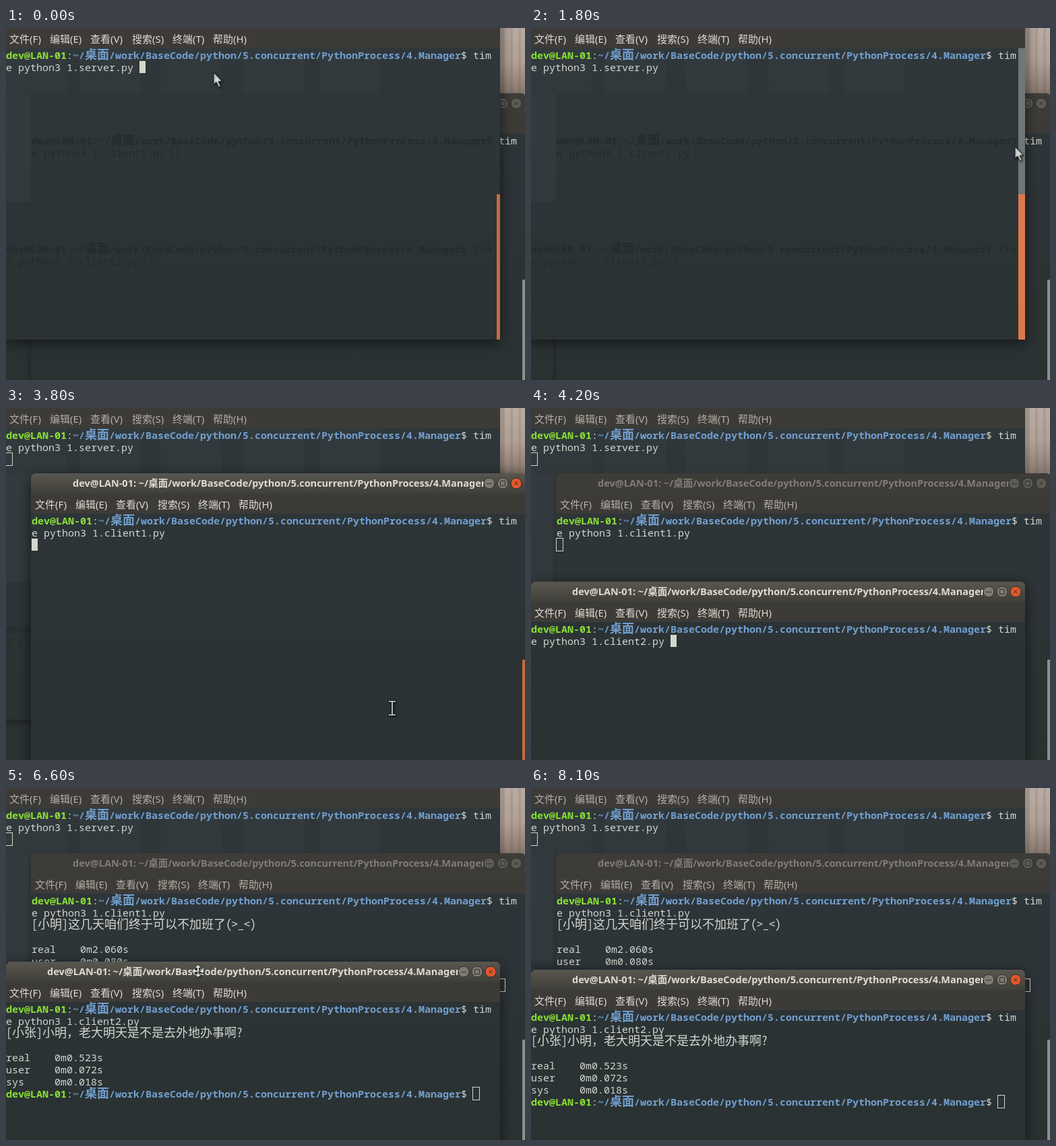
These frames come from a looping animation (770 px wide and 523 px high, 8200 ms). An HTML page with a canvas:

```html
<!DOCTYPE html>
<html lang="zh">
<head>
<meta charset="utf-8">
<style>
  html, body { margin: 0; width: 100%; height: 100%; overflow: hidden; background: #2d3436; }
  canvas { display: block; }
</style>
</head>
<body>
<canvas id="stage" width="770" height="523"></canvas>
<script>
const ctx = document.getElementById('stage').getContext('2d');
const LOOP = 8200, STEP = 100, BLINK = 600;
const COL = 9, ROW = 18, WIDTH = 733, HEIGHT = 463, TITLE = 30;
const CJK = '"Noto Sans CJK SC", "Noto Sans CJK"';
const MONO = `15px "Noto Sans Mono", monospace`;
const WIDE = `18px "Noto Sans Mono CJK SC", ${CJK}, monospace`;
const SANS = `"Noto Sans", ${CJK}, sans-serif`;
const GREEN = '#8ae234', BLUE = '#729fcf', TEXT = '#d3d7cf', GHOST = '#242b2d';
const HOST = 'dev@LAN-01';
const PATH = '~/桌面/work/BaseCode/python/5.concurrent/PythonProcess/4.Manager';
const MENU = [['文件(F)', 5], ['编辑(E)', 65], ['查看(V)', 125], ['搜索(S)', 187], ['终端(T)', 247], ['帮助(H)', 307]];
const PROMPT_COL = 77;

// x, y locate the menu bar; the title bar sits above it.
const server = { x: 0, y: 0, script: '1.server.py', enter: 1000, done: Infinity };
const client1 = { x: 38, y: 127, script: '1.client1.py', enter: 3300, done: 5400,
  message: '[小明]这几天咱们终于可以不加班了(>_<)', times: ['2.060', '0.080', '0.020'] };
const client2 = { x: 0, y: 288, script: '1.client2.py', enter: 4700, done: 5200,
  message: '[小张]小明，老大明天是不是去外地办事啊?', times: ['0.523', '0.072', '0.018'] };

// Window order, back to front
const STACKS = [
  [0, [client2, client1, server]],
  [2100, [client2, server, client1]],
  [4200, [server, client1, client2]]
];
// Keyboard focus; every entry restarts the blinking
const FOCUS = [[-500, server], [1000, server], [2100, client1], [3300, client1], [4100, null],
  [4200, client2], [4700, client2], [5100, client2], [6600, null], [7200, client2], [8100, null]];
const DRAG = [[0, 0], [6700, 5], [6800, 10], [7000, 11], [7100, 12]];
const POINTER = [
  [0, arrow, 308, 66], [100, beam, 309, 67], [700, null],
  [1400, beam, 309, 66], [1500, beam, 490, 112], [1600, beam, 675, 162],
  [1800, arrow, 718, 176], [1900, beam, 742, 188], [2000, beam, 755, 205],
  [2400, beam, 722, 214], [2500, beam, 640, 226], [2600, beam, 580, 231], [2700, beam, 559, 231],
  [3300, null], [3500, beam, 559, 231], [3600, beam, 563, 256], [3700, beam, 569, 340],
  [3800, beam, 573, 446], [3900, null],
  [5000, beam, 520, 497], [5100, beam, 500, 455], [5200, beam, 480, 420], [5300, beam, 466, 400],
  [5700, beam, 440, 378], [5800, beam, 390, 345], [5900, arrow, 330, 305], [6000, arrow, 290, 276],
  [6100, beam, 270, 255], [6200, arrow, 280, 266], [6300, arrow, 285, 271],
  [6600, fleur, 285, 272], [6700, fleur, 285, 277], [6800, fleur, 286, 282], [7000, fleur, 286, 283],
  [7100, fleur, 286, 284], [7300, arrow, 286, 284],
  [7500, arrow, 256, 236], [7600, arrow, 172, 112], [7700, arrow, 96, 12], [7800, null]
];

const latest = (list, t) => list.findLast(entry => entry[0] <= t);

function box(x, y, w, h, color) {
  ctx.fillStyle = color;
  ctx.fillRect(x, y, w, h);
}

function gradient(y0, y1, ...colors) {
  const g = ctx.createLinearGradient(0, y0, 0, y1);
  colors.forEach((c, i) => g.addColorStop(i / (colors.length - 1), c));
  return g;
}

function label(text, x, y, font, color) {
  ctx.font = font;
  ctx.fillStyle = color;
  ctx.fillText(text, x, y);
}

// Text on the terminal grid: wide characters take two cells. Returns the end position.
function cells(text, x, y, color, bold = '', font = MONO) {
  for (const char of text) {
    const wide = char > '~';
    label(char, x, y, `${bold} ${wide ? WIDE : font}`, color);
    x += wide ? 2 * COL : COL;
  }
  return x;
}

function prompt(x, y, tail, ghost) {
  x = cells(HOST, x, y, ghost || GREEN, 'bold');
  x = cells(':', x, y, ghost || TEXT);
  x = cells(PATH, x, y, ghost || BLUE, 'bold');
  cells('$ ' + tail, x, y, ghost || TEXT);
}

function textCursor(win, t, ghost) {
  const [since, focused] = latest(FOCUS, t);
  const [col, row] = t >= win.done ? [PROMPT_COL, 7]
    : t >= win.enter ? [0, 2] : [win.script.length + 11, 1];
  const x = win.x + col * COL, y = win.y + 31 + row * ROW;
  if (ghost || focused !== win) {
    ctx.strokeStyle = ghost || TEXT;
    ctx.lineWidth = 1;
    ctx.strokeRect(x - .5, y - .5, 10, 19);
  } else if (Math.floor((t - since) / BLINK) % 2 === 0) {
    box(x, y, COL, ROW, TEXT);
  }
}

function content(win, t, ghost) {
  const line = row => win.y + 46 + row * ROW;
  prompt(win.x, line(0), 'tim', ghost);
  cells('e python3 ' + win.script, win.x, line(1), ghost || TEXT);
  if (t >= win.done) {
    cells(win.message, win.x, line(2), TEXT, '', WIDE);
    ['real', 'user', 'sys'].forEach((name, i) =>
      cells(name.padEnd(8) + '0m' + win.times[i] + 's', win.x, line(4 + i), TEXT));
    prompt(win.x, line(7), '');
  }
  textCursor(win, t, ghost);
}

function button(x, y, kind, active) {
  const close = kind === 2;
  ctx.beginPath();
  ctx.arc(x, y, 8, 0, 7);
  ctx.fillStyle = !active ? '#5c5a54' : close ? '#e2572b' : '#7d7a72';
  ctx.fill();
  ctx.strokeStyle = '#302f2b';
  ctx.lineWidth = 1;
  ctx.stroke();
  ctx.beginPath();
  if (kind === 0) { ctx.moveTo(x - 4, y + .5); ctx.lineTo(x + 4, y + .5); }
  if (kind === 1) ctx.rect(x - 3.5, y - 3.5, 7, 7);
  if (close) {
    ctx.moveTo(x - 2.5, y - 2.5); ctx.lineTo(x + 2.5, y + 2.5);
    ctx.moveTo(x + 2.5, y - 2.5); ctx.lineTo(x - 2.5, y + 2.5);
  }
  ctx.strokeStyle = '#33312d';
  ctx.stroke();
}

function scrollbar(win, t, active) {
  const right = win.x + WIDTH, thumb = win.y + 247, length = HEIGHT - 247;
  if (win === server && t >= 1800 && t < 2100) {
    box(right - 10, 30, 10, 217, '#707777');
    box(right - 10, thumb, 10, length, '#dc784b');
  } else {
    box(right - 5, thumb, 5, length, active ? '#c66b3d' : '#8d908f');
  }
}

function drawWindow(win, t, active, behind) {
  const { x, y } = win, top = y - TITLE;
  ctx.save();
  ctx.shadowColor = `rgba(0,0,0,${active ? .6 : .35})`;
  ctx.shadowBlur = active ? 20 : 10;
  ctx.shadowOffsetY = 4;
  ctx.beginPath();
  ctx.roundRect(x - (x ? 1 : 0), top, WIDTH + (x ? 1 : 0), HEIGHT + TITLE, [7, 7, 0, 0]);
  ctx.fillStyle = gradient(0, 523, '#30373a', '#2d3437', '#2a3131');
  ctx.fill();
  ctx.restore();

  ctx.save();
  ctx.clip();
  box(x - 1, top, WIDTH + 1, TITLE, active ? gradient(top, y, '#59574f', '#403f3a') : '#3d3c38');
  box(x - 1, y, WIDTH + 1, 30, '#3c3b37');
  if (win === server) {
    for (const left of [0, 110, 230, 352, 465]) box(left, 30, 90, 67, 'rgba(255,255,255,.014)');
    box(0, 98, 37, 160, 'rgba(255,255,255,.025)');
  }
  for (const other of behind) content(other, t, GHOST);
  ctx.restore();

  const title = active ? '#dfdbd2' : '#807d77';
  if (win !== server) {
    label(`${HOST}: ${PATH}`, x + 61, top + 20, `bold 14.5px ${SANS}`, title);
    [0, 1, 2].forEach(i => button(x + WIDTH - 54 + 20 * i, top + 15, i, active));
  }
  for (const [text, left] of MENU)
    label(text, x + left, y + 22, `15px ${SANS}`, active ? '#dfdbd2' : '#b3afa7');
  content(win, t);
  scrollbar(win, t, active);
}

function wallpaper() {
  box(0, 0, 770, 523, '#2d3436');
  box(733, 0, 37, 100, gradient(0, 100, '#b9aca2', '#b0a096', '#85756c'));
  for (let x = 736; x < 770; x += 12) box(x, 0, 4, 100, 'rgba(80,60,50,.12)');
}

function polygon(points) {
  ctx.beginPath();
  points.forEach(([x, y]) => ctx.lineTo(x, y));
  ctx.closePath();
}

function arrow() {
  polygon([[0, 0], [0, 18], [4, 14.5], [7.5, 22], [10.5, 20.5], [7.2, 13.5], [12.5, 13]]);
  ctx.fillStyle = '#d5dad6';
  ctx.fill();
  ctx.strokeStyle = '#151a1b';
  ctx.lineWidth = 1;
  ctx.stroke();
}

function beam() {
  const stroke = (color, width) => {
    ctx.beginPath();
    for (const side of [-1, 1]) {
      ctx.moveTo(-5, side * 10); ctx.lineTo(5, side * 10);
    }
    ctx.moveTo(0, -10); ctx.lineTo(0, 10);
    ctx.strokeStyle = color;
    ctx.lineWidth = width;
    ctx.stroke();
  };
  stroke('#1a1f20', 3.5);
  stroke('#d5dad6', 1.7);
}

function fleur() {
  for (let i = 0; i < 4; i++) {
    ctx.rotate(Math.PI / 2);
    polygon([[-1, 0], [-1, -5], [-4, -5], [0, -9], [4, -5], [1, -5], [1, 0]]);
    ctx.strokeStyle = '#25282a';
    ctx.lineWidth = 1;
    ctx.stroke();
    ctx.fillStyle = '#e2e5e1';
    ctx.fill();
  }
  box(-1, -1, 2, 2, '#e2e5e1');
}

function render(t) {
  client2.y = 288 + latest(DRAG, t)[1];
  wallpaper();
  const stack = latest(STACKS, t)[1];
  stack.forEach((win, i) =>
    drawWindow(win, t, i === 2, win === server ? stack.slice(0, i) : []));
  const [, shape, x, y] = latest(POINTER, t);
  if (shape) {
    ctx.save();
    ctx.translate(x, y);
    ctx.shadowColor = 'rgba(0,0,0,.5)';
    ctx.shadowBlur = 3;
    ctx.shadowOffsetX = ctx.shadowOffsetY = 1;
    shape();
    ctx.restore();
  }
}

const start = performance.now();
function tick() {
  const t = (performance.now() - start) % LOOP;
  render(Math.floor(t / STEP) * STEP);
  requestAnimationFrame(tick);
}
tick();
</script>
</body>
</html>
```
